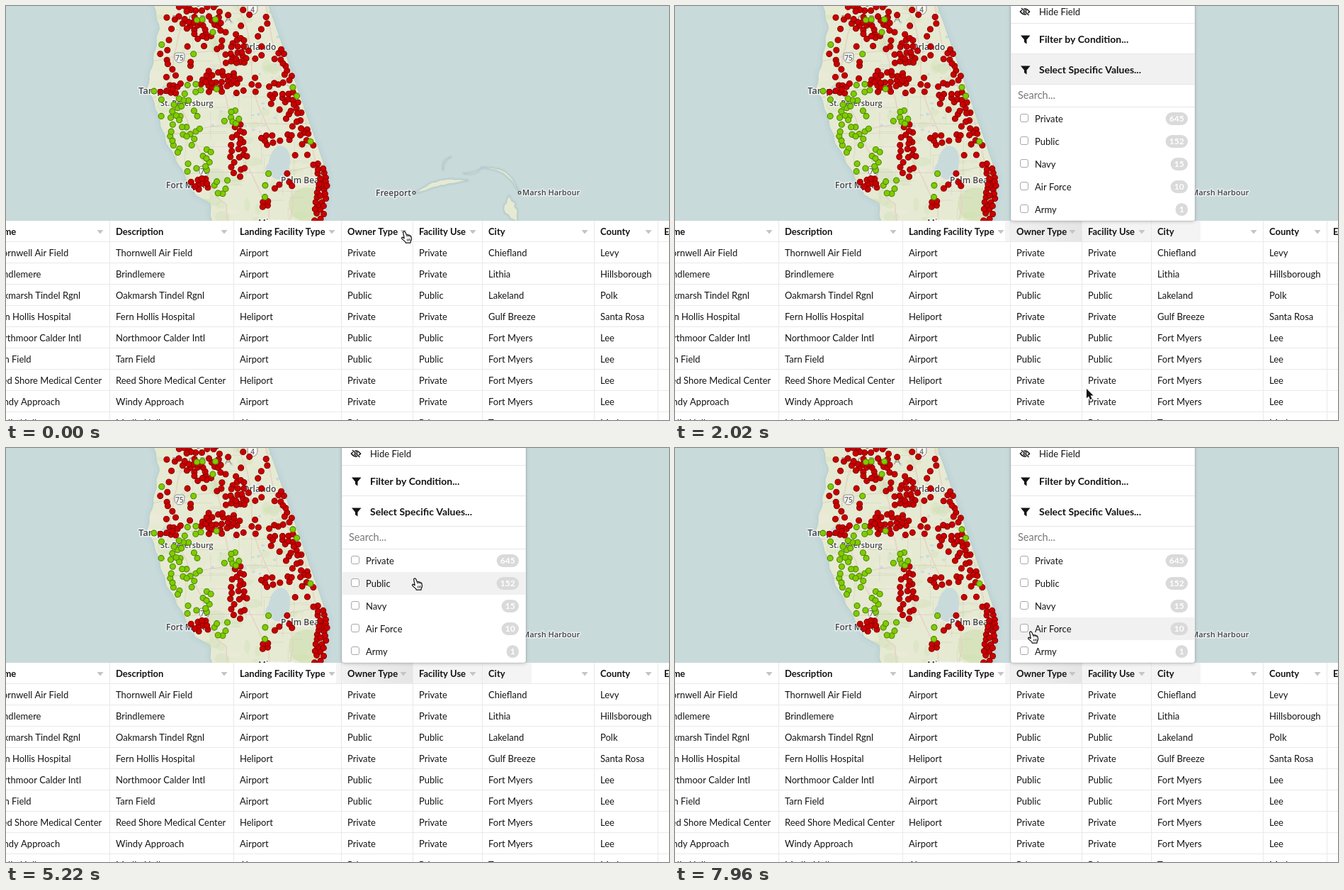
An HTML page with a canvas that plays this animation: 936x584 px, repeating every 8 s.

```html
<!DOCTYPE html>
<html lang="en">
<head>
<meta charset="utf-8">
<title>Map and table filter menu</title>
<style>
html, body { margin: 0; width: 100%; height: 100%; overflow: hidden; background: #fff; }
canvas { display: block; }
</style>
</head>
<body>
<canvas id="stage" width="936" height="584"></canvas>
<script>
const LOOP = 8000, W = 936, H = 584, TABLE_Y = 303;
const UI = 'Lato, sans-serif', MAP = '"Open Sans", "Noto Sans", sans-serif';
const INK = '#141414', WATER = '#c9dadb', LAND = '#e6ead3', RULE = '#e9e9e9';
let g;

let seed = 11;
const rand = () => (seed = (seed * 16807) % 2147483647) / 2147483647;
const between = (a, b) => a + (b - a) * rand();
const lerp = (a, b, f) => a + (b - a) * f;
const range = (n, fn) => Array.from({ length: n }, (_, i) => fn(i));

function text(str, x, y, size, weight = 400, color = INK, family = UI) {
  g.font = `${weight} ${size}px ${family}`;
  g.fillStyle = color;
  g.fillText(str, x, y);
}

function rect(x, y, w, h, color) {
  g.fillStyle = color;
  g.fillRect(x, y, w, h);
}

function round(x, y, w, h, r, fill, stroke) {
  const p = new Path2D();
  p.roundRect(x, y, w, h, r);
  if (fill) shape(p, fill);
  if (stroke) line(p, stroke, 1);
}

function shape(path, color) {
  g.fillStyle = color;
  g.fill(path);
}

function line(path, color, width) {
  g.strokeStyle = color;
  g.lineWidth = width;
  g.stroke(path);
}

function poly(pts, closed) {
  const p = new Path2D();
  pts.forEach(pt => p.lineTo(...pt));
  if (closed) p.closePath();
  return p;
}

function blob(x, y, rx, ry, color, turn = 0) {
  const p = new Path2D();
  p.ellipse(x, y, rx, ry, turn, 0, 7);
  shape(p, color);
}

// Tapered, slightly ragged strip of land between two points.
function sliver(x0, y0, x1, y1, bend, width) {
  const n = 14, len = Math.hypot(x1 - x0, y1 - y0);
  const nx = (y1 - y0) / len, ny = (x0 - x1) / len;
  const side = s => range(n + 1, i => {
    const f = i / n, arch = Math.sin(Math.PI * f);
    const off = bend * arch + s * width * arch * (.7 + .6 * rand());
    return [lerp(x0, x1, f) + nx * off, lerp(y0, y1, f) + ny * off];
  });
  const p = poly([...side(1), ...side(-1).reverse()], true);
  line(p, 'rgba(180,206,212,.5)', 5);
  shape(p, LAND);
  line(p, '#b2c4bd', .8);
}

// West coast key points as [y, x]; the east coast is nearly straight.
const WEST = [[-20, 203], [28, 216], [75, 208], [115, 199], [142, 211], [190, 225], [235, 250], [268, 268], [276, 287], [340, 295]];
function west(y) {
  const i = Math.max(1, WEST.findIndex(p => p[0] >= y));
  const [a, b] = [WEST[i - 1], WEST[i]];
  return lerp(a[1], b[1], (y - a[0]) / (b[0] - a[0])) + Math.sin(y / 4) * 1.2;
}
const east = y => 371 + .35 * y - .45 * Math.max(0, y - 242);
const across = (y, f) => lerp(west(y), east(y), f);

function drawLand() {
  const ys = range(56, i => -10 + i * 6);
  const land = poly([...ys.map(y => [west(y), y]), ...ys.reverse().map(y => [east(y), y])], true);
  g.lineJoin = 'round';
  line(land, 'rgba(182,206,212,.25)', 14);
  line(land, 'rgba(182,206,212,.35)', 6);
  shape(land, LAND);
  g.save();
  g.clip(land);
  const tints = ['rgba(204,222,174,.35)', 'rgba(238,236,222,.6)', 'rgba(214,226,190,.5)'];
  range(90, i => blob(between(200, 455), between(0, 303), between(3, 15), between(3, 10), tints[i % 3]));
  blob(425, 280, 26, 24, 'rgba(204,223,172,.55)');
  range(40, () => blob(between(285, 385), between(0, 180), between(1, 3), between(1, 2.5), WATER));
  range(70, i => {
    const x = between(205, 440), y = between(0, 300), len = between(12, 50);
    line(poly([[x, y], i % 2 ? [x + len, y] : [x, y + len]]), 'rgba(186,180,160,.3)', .8);
  });
  for (const f of [.17, .48, .72, .95]) {
    const road = poly(range(32, i => [across(i * 10, f) + 5 * Math.sin(i / 3 + f * 9), i * 10]));
    line(road, '#dfc7b8', 1.5);
    line(road, '#f3e8d8', .5);
  }
  for (const y of [78, 128, 184, 248]) {
    line(poly(range(28, i => [195 + i * 10, y - i + 5 * Math.sin(i / 4 + y)])), '#dbd2c0', 1);
  }
  g.restore();
  line(land, 'rgba(150,180,180,.5)', .8);
  blob(386, 221, 15, 24, WATER, .15);
  blob(378, 228, 10, 13, WATER, .8);
  line(poly([[203, 121], [215, 123], [224, 114], [229, 124]]), WATER, 4);

  sliver(577, 264, 652, 246, 5, 4);
  sliver(710, 268, 722, 304, -4, 8);
  sliver(672, 228, 724, 262, 11, 1.5);
  sliver(617, 231, 628, 213, 4, .5);
  sliver(646, 236, 671, 229, -3, .8);
}

function dot(x, y, green) {
  const p = new Path2D();
  p.arc(x, y, 4, 0, 7);
  shape(p, green ? '#80cc00' : '#c90000');
  line(p, green ? '#4f8500' : '#8a0000', 1.1);
}

const placed = [];
// Places dots from a random rule, keeping them from stacking up.
function scatter(count, green, pick) {
  range(count, () => {
    for (let tries = 0; tries < 12; tries++) {
      const [x, y] = pick();
      if (placed.some(p => Math.hypot(p[0] - x, p[1] - y) < 5.2)) continue;
      placed.push([x, y]);
      dot(x, y, green);
      return;
    }
  });
}

function around(count, cx, cy, rx, ry, green) {
  scatter(count, green, () => {
    const a = rand() * 2 * Math.PI, r = Math.sqrt(rand());
    return [cx + rx * r * Math.cos(a), cy + ry * r * Math.sin(a)];
  });
}

function band(count, top, bottom, edge, near, far, green) {
  scatter(count, green, () => {
    const y = between(top, bottom);
    return [edge(y) + between(near, far), y];
  });
}

function drawDots() {
  around(22, 328, 64, 15, 20);
  around(30, 278, 14, 24, 34);
  around(26, 302, 104, 30, 14);
  around(11, 234, 117, 9, 8);
  around(24, 328, 205, 13, 40);
  around(12, 272, 251, 17, 9);
  around(5, 366, 279, 5, 7);
  around(7, 375, 190, 18, 8);
  scatter(60, false, () => {
    const y = between(0, 125);
    return [across(y, between(.05, .95)), y];
  });
  band(10, 60, 105, east, -12, -2);
  band(9, 105, 138, east, -65, -5);
  band(30, 120, 215, east, -38, -5);
  band(46, 222, 303, east, -16, -1);
  band(5, 236, 260, east, -75, -50);

  band(26, 120, 185, west, 2, 55, true);
  band(22, 180, 270, west, 4, 55, true);
  around(7, 322, 157, 16, 11, true);
  around(6, 280, 116, 30, 8, true);
  band(6, 0, 90, west, 5, 85, true);
  band(4, 70, 200, east, -9, -3, true);
  around(4, 355, 252, 45, 20, true);
}

function label(str, x, y, size) {
  g.font = `600 ${size}px ${MAP}`;
  g.strokeStyle = 'rgba(255,255,255,.6)';
  g.lineWidth = 3;
  g.strokeText(str, x, y);
  text(str, x, y, size, 600, '#444446', MAP);
}

function shield(num, x, y) {
  round(x - 7, y - 7, 14, 14, [3, 3, 7, 7], '#f6f6f2', '#8a8d8d');
  g.textAlign = 'center';
  text(num, x, y + 4, 10, 600, '#666', MAP);
  g.textAlign = 'left';
}

function drawMap() {
  rect(0, 0, W, TABLE_Y, WATER);
  drawLand();
  g.letterSpacing = '4px';
  text('FLORIDA', 234, 23, 15, 400, '#93958c', MAP);
  g.letterSpacing = '0px';
  shield('75', 245, 73);
  shield('75', 280, 233);
  shield('4', 348, 5);
  label('Orlando', 334, 62, 12);
  label('Tampa', 187, 124, 13);
  label('St. Petersburg', 218, 141, 11);
  label('Fort Myers', 226, 257, 12);
  label('Palm Beach', 388, 250, 12);
  label('Miramar', 356, 310, 12);
  label('Freeport', 522, 268, 12);
  label('Marsh Harbour', 729, 267, 11);
  for (const x of [576, 725]) {
    blob(x, 263.5, 2.4, 2.4, '#333');
    blob(x, 263.5, 1.2, 1.2, '#fff');
  }
  drawDots();
}

const COLS = [-20, 155, 330, 482, 583, 681, 839, 929];
const HEADS = ['Name', 'Description', 'Landing Facility Type', 'Owner Type', 'Facility Use', 'City', 'County', 'Elevation'];
const ROWS = [
  ['Thornwell Air Field', 'Airport', 'Private', 'Chiefland', 'Levy'],
  ['Brindlemere', 'Airport', 'Private', 'Lithia', 'Hillsborough'],
  ['Oakmarsh Tindel Rgnl', 'Airport', 'Public', 'Lakeland', 'Polk'],
  ['Fern Hollis Hospital', 'Heliport', 'Private', 'Gulf Breeze', 'Santa Rosa'],
  ['Northmoor Calder Intl', 'Airport', 'Public', 'Fort Myers', 'Lee'],
  ['Tarn Field', 'Airport', 'Public', 'Fort Myers', 'Lee'],
  ['Reed Shore Medical Center', 'Heliport', 'Private', 'Fort Myers', 'Lee'],
  ['Windy Approach', 'Airport', 'Private', 'Fort Myers', 'Lee'],
  ['Marlin Hollow', 'Airport', 'Private', 'Tavares', 'Marion']];

function drawTable(open) {
  rect(0, TABLE_Y, W, H - TABLE_Y, '#fff');
  if (open) {
    rect(466, 303, 276, 29, '#f4f4f4');
    const shade = g.createLinearGradient(474, 0, 574, 0);
    shade.addColorStop(0, '#f1f1f1');
    shade.addColorStop(1, '#e5e5e5');
    rect(474, 303, 100, 29, shade);
  }
  for (let y = 332; y < H; y += 30) rect(0, y, W, 1, RULE);
  COLS.forEach((x, i) => {
    rect(x - 9, TABLE_Y, 1, H - TABLE_Y, RULE);
    text(HEADS[i], x, 323, 13, 700);
    if (i) shape(new Path2D(`M${x - 26.5} 316h9l-4.5 5.5z`), '#c4c4c4');
  });
  ROWS.forEach(([name, type, owner, city, county], r) =>
    [name, name, type, owner, owner, city, county].forEach((s, c) => text(s, COLS[c], 353 + r * 30, 13)));
}

function sortItem(y, from, to, arrowX) {
  shape(new Path2D(`M490 ${y - 6}h2v8h2.2l-3.2 4-3.2-4h2.2z`), INK);
  range(4, i => rect(495.5, y - 6 + i * 3.3, from === 'A' ? 2 + i * 1.5 : 6.5 - i * 1.5, 1.8, INK));
  text('Sort ' + from, 514, y + 5, 13);
  line(new Path2D(`M${arrowX} ${y + .5}h8.5m-3 -2.5l3 2.5l-3 2.5`), INK, 1.1);
  text(to, arrowX + 13.5, y + 5, 13);
}

function eyeIcon(y) {
  const slash = new Path2D(`M489 ${y - 5}l10.5 10`);
  line(new Path2D(`M487.5 ${y}q6.5 -8 13 0q-6.5 8 -13 0z`), INK, 1.6);
  blob(494, y, 2.8, 2.8, INK);
  line(slash, '#fff', 3);
  line(slash, INK, 1.4);
}

function filterItem(y, str) {
  shape(new Path2D(`M488 ${y - 5.5}h13.5l-5 6v6l-3.5 -2.5v-3.5z`), INK);
  text(str, 514, y + 5, 14, 700);
}

const VALUES = [['Private', 645], ['Public', 152], ['Navy', 15], ['Air Force', 10], ['Army', 1]];
const valueY = i => 614 + i * 32;
// Top and height of every row that reacts to the pointer.
const ITEMS = [[383, 32], [415, 32], [447, 32], [480, 42], [523, 42], ...VALUES.map((_, i) => [valueY(i) - 16, 32])];
const SELECT = 4;

// Laid out as when it hangs below the header; shift moves it above.
function drawMenu(shift, expanded, hover) {
  const bottom = expanded ? 758 : 566;
  g.save();
  g.translate(0, shift);
  g.shadowColor = 'rgba(34,36,38,.28)';
  g.shadowBlur = 5;
  g.shadowOffsetY = 1;
  round(474, 332.5, 260, bottom - 332.5, 3, '#fff');
  g.shadowColor = 'transparent';
  round(474, 332.5, 260, bottom - 332.5, 3, null, 'rgba(34,36,38,.1)');
  if (hover >= 0) rect(474, ITEMS[hover][0], 260, ITEMS[hover][1], '#f1f1f1');

  round(484.5, 343.5, 239, 27, 3, '#fff', '#d2d2d2');
  text('Search...', 490, 362, 14.5, 400, '#777');
  line(new Path2D('M712.9 355a4.4 4.4 0 1 0 -8.8 0a4.4 4.4 0 1 0 8.8 0M711.6 358.2l4.6 4.6'), INK, 2.2);

  [382, 479, 522, 565, 597].forEach(y => y < bottom - 1 && rect(474, y, 260, 1, '#e6e6e6'));
  sortItem(399, 'A', 'Z', 554.5);
  sortItem(431, 'Z', 'A', 553);
  eyeIcon(463);
  text('Hide Field', 514, 468, 13);
  filterItem(502, 'Filter by Condition...');
  filterItem(545, 'Select Specific Values...');

  if (expanded) {
    text('Search...', 484, 586, 14.5, 400, '#777');
    VALUES.forEach(([name, count], i) => {
      const y = valueY(i);
      round(487.5, y - 6.5, 11, 11, 2.5, '#fff', '#a9a9a9');
      text(name, 508, y + 5, 13);
      g.font = `700 12px ${UI}`;
      const w = g.measureText(count).width + 10.5;
      round(724 - w, y - 9, w, 18, 9, '#dadada');
      text(count, 724 - w + 5.25, y + 4.3, 12, 700, '#fff');
    });
  }
  g.restore();
}

// Start, end and goal of each pointer move, sampled about every 118 ms.
const TICK = 118;
const MOVES = [
  [1200, 1900, 577, 539], [2500, 3210, 570, 195], [3320, 3440, 570, 180],
  [3800, 4030, 571, 174], [4750, 5220, 573, 183], [5340, 5460, 573, 206],
  [5580, 5700, 574, 216], [5930, 6410, 576, 256], [7610, 7960, 498, 258]];

function pointerAt(t) {
  let x = 558, y = 317;
  for (const [start, end, goalX, goalY] of MOVES) {
    if (t < start) break;
    const gaps = Math.round((end - start) / TICK);
    const step = Math.floor((t - start) / (end - start) * gaps + .06) + 1;
    const f = Math.min(1, step / (gaps + 1)), eased = f * f * (3 - 2 * f);
    x = lerp(x, goalX, eased);
    y = lerp(y, goalY, eased);
  }
  return [Math.round(x), Math.round(y)];
}

const HAND = new Path2D('M2.6 2.2Q3.8 -.2 5.6 1.8L7.6 6.2Q9 5.2 9.9 6.4Q11.4 5.6 12.1 7Q13.7 6.7 14 8.4' +
  'L14.5 11.6Q14.5 13.4 13.2 15L13 17.2H6.2L5.8 15.6L1.2 11.6Q-.2 9.6 1.6 9.2L4.2 10.6Z');
const KNUCKLES = new Path2D('M7.6 6.4l.9 2.4M9.9 6.6l.8 2M12.1 7.2l.5 1.6M8.3 11.5l.4 3.2M10.2 11.3l.3 3.2M12 11l.1 3.2');
const ARROW = new Path2D('M0 0V13.2L3.1 10.4L5.2 15.2L7.6 14.1L5.5 9.4H9.6Z');

function drawPointer(x, y, hand) {
  g.save();
  g.lineJoin = 'round';
  if (hand) {
    g.translate(x, y);
    shape(HAND, '#fff');
    line(HAND, '#111', 1.2);
    line(KNUCKLES, '#111', .8);
  } else {
    g.translate(x + 4, y + 1);
    line(ARROW, '#fff', 2.4);
    shape(ARROW, '#111');
  }
  g.restore();
}

const stage = document.getElementById('stage').getContext('2d');
const map = document.createElement('canvas');
map.width = W;
map.height = TABLE_Y;
g = map.getContext('2d');
drawMap();
g = stage;

function frame(now) {
  const t = now % LOOP;
  const open = t >= 720, above = t >= 2020;
  const shift = above ? -455 : 0;
  const [x, y] = pointerAt(t);
  g.drawImage(map, 0, 0);
  drawTable(open);
  if (open) {
    const local = y - shift;
    const over = ITEMS.findIndex(([top, h]) => local >= top && local < top + h);
    drawMenu(shift, t >= 1900, above && t < 2500 ? SELECT : over);
  }
  drawPointer(x, y, !above || y < TABLE_Y);
  requestAnimationFrame(frame);
}
requestAnimationFrame(frame);
</script>
</body>
</html>
```
